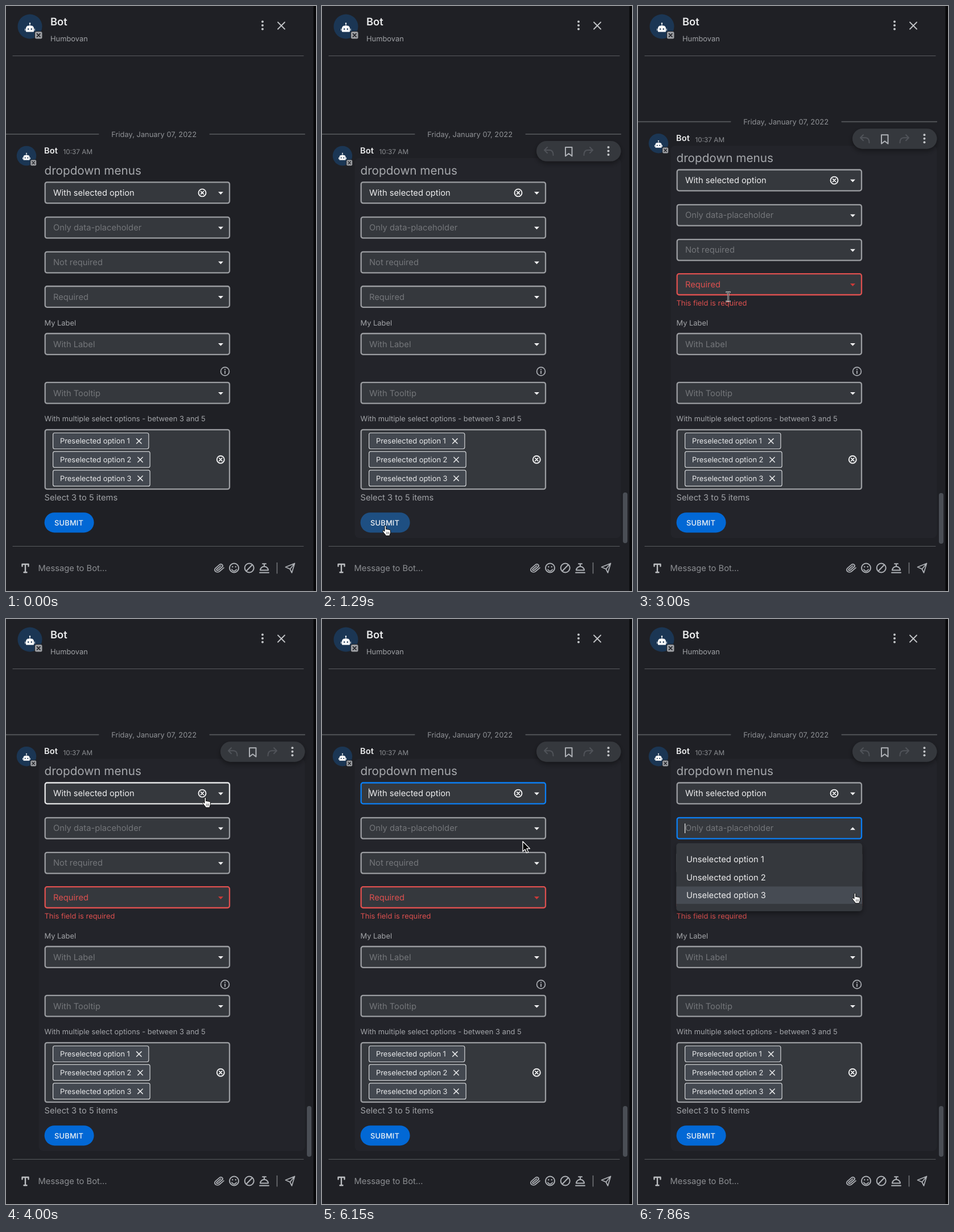
An HTML page that plays this animation: 545x1027 px, repeating every 8 s.

```html
<!DOCTYPE html>
<html lang="en">
<head>
<meta charset="utf-8">
<title>Dropdown menus</title>
<style>
  html, body { margin: 0; width: 100%; height: 100%; overflow: hidden; background: #1f2025; }
  svg { display: block; width: 545px; height: 1027px; }
  text { font-family: Inter, sans-serif; font-optical-sizing: none; text-rendering: geometricPrecision; }
  .line { fill: none; stroke-linecap: round; stroke-linejoin: round; }
</style>
</head>
<body>
<svg id="stage" viewBox="0 0 545 1027" xmlns="http://www.w3.org/2000/svg"></svg>
<script>
const STEP = 8000 / 56, LOOP = 8000, SHIFT = -21.8;
const BODY = 14.72, SMALL = 12.88;
const GREY = '#9b9da1', RED = '#dd504f', BLUE = '#0b7ff5', LIGHT = '#e6e7e8', ICON = '#adb0b5';

const text = (x, y, str, size, fill, weight = 400, extra = '') =>
  `<text x="${x}" y="${y}" font-size="${size}" fill="${fill}" font-weight="${weight}" ${extra}>${str}</text>`;
const rect = (x, y, w, h, r, fill, extra = '') =>
  `<rect x="${x}" y="${y}" width="${w}" height="${h}" rx="${r}" fill="${fill}" ${extra}/>`;
const path = (d, stroke, width = 2, extra = '') =>
  `<path class="line" d="${d}" stroke="${stroke}" stroke-width="${width}" ${extra}/>`;
const ring = (x, y, r, stroke, width) =>
  `<circle cx="${x}" cy="${y}" r="${r}" fill="none" stroke="${stroke}" stroke-width="${width}"/>`;
const cross = (x, y, s, stroke, width) =>
  path(`M${x - s} ${y - s}l${2 * s} ${2 * s}m0 ${-2 * s}l${-2 * s} ${2 * s}`, stroke, width);
const dots = (x, y) => [-6.5, 0, 6.5].map(d => `<circle cx="${x}" cy="${y + d}" r="2" fill="#c3c5c8"/>`).join('');
const clear = (x, y) => ring(x, y, 6.5, '#f0f0f1', 1.9) + cross(x, y, 2.3, '#f0f0f1', 1.9);

function avatar(x, y, s) {
  return `<g transform="translate(${x} ${y}) scale(${s})">
    <circle r="21.5" fill="#1b3654"/>
    <path d="M-6 9.500Q-7 9.500-7 8.500V4Q-7-1.500-2-1.500H2Q7-1.500 7 4V8.500Q7 9.500 6 9.500Z" fill="#fff"/>
    <path d="M0-1.500V-5M-8.200 4V7M8.200 4V7" stroke="#fff" stroke-width="1.1" stroke-linecap="round"/>
    <circle cy="-5.500" r="1.200" fill="#fff"/>
    <circle cx="-2.800" cy="4.500" r="1.300" fill="#1b3654"/><circle cx="2.800" cy="4.500" r="1.300" fill="#1b3654"/>
    ${rect(8, 8, 14.5, 14.5, 3.5, '#1f2025')}${rect(9, 9, 12.5, 12.5, 2.5, GREY)}
    ${cross(15.25, 15.25, 2.7, '#1f2025', 1.7)}</g>`;
}

function field(i, y, label, selected) {
  return rect(68.7, y - 18.4, 324.3, 36.8, 3.5, '#35383d', `id="box${i}" stroke="${GREY}" stroke-width="2.3"`)
    + text(83, y + 5.3, label, BODY, selected ? '#eeeeef' : '#74767a', 400, `id="label${i}"`)
    + (selected ? clear(345, y + .2) : '')
    + `<path id="tri${i}" d="M-4.500-2.200H4.500L0 2.500Z" fill="#f4f4f5"/>`;
}

function chip(n, y, w) {
  return rect(82.6, y - 14, w, 28, 3, '#434850', 'stroke="#d3d5d8" stroke-width="1.2"')
    + text(95, y + 4.7, `Preselected option ${n}`, SMALL, '#e9eaeb')
    + cross(w + 65.5, y + .3, 4.2, '#e9eaeb', 1.5);
}

function menu(id, y, options, checked) {
  return `<g id="${id}">` + rect(67.4, y, 326.8, 119.4, 5, '#34373c', 'filter="url(#shadow)"')
    + rect(67.4, y + 13, 326.8, 30.5, 0, '#464b53', `id="${id}Row"`)
    + options.map((o, i) => text(85, y + 33.4 + 31.5 * i, o, BODY, '#eeeeef')).join('')
    + (checked ? path(`M361 ${y + 60}l5 5l10-10.500`, '#f0f0f1', 1.8) : '') + '</g>';
}

const fieldsY = [327.7, 389, 450, 510.4, 593.4, 679.3];
const labels = ['With selected option', 'Only data-placeholder', 'Not required', 'Required', 'With Label', 'With Tooltip'];
const makeField = i => field(i, fieldsY[i], labels[i], i === 0);

const header = avatar(42, 36, 1)
  + text(78, 33.6, 'Bot', 18.4, '#e9eaeb', 600)
  + text(78, 61.8, 'Humbovan', SMALL, '#a0a2a6')
  + dots(451, 34) + cross(484, 34.5, 6, '#c3c5c8', 1.8)
  + path('M12 87.500H523M12 948.500H523', '#595b5f', 1.2);

const toolbar = '<g id="tools">'
  + rect(377, 237, 148.5, 35.5, 17.7, '#36383d', 'filter="url(#shadow)"')
  + path('M396 248l-5 5l5 5M391.500 253H400Q406.500 253 406.500 262', '#505359', 2)
  + path('M428 248h11.500v15.500l-5.750-4.500l-5.750 4.500z', ICON, 2)
  + path('M471 248l5 5l-5 5M475.500 253H467Q460.500 253 460.500 262', '#505359', 2)
  + dots(503.5, 254.5) + '</g>';

const upper = '<g id="upper">'
  + path('M0 225H162.500M358.500 225H525', '#4b4d51', 2.2)
  + text(185.3, 229.7, 'Friday, January 07, 2022', SMALL, '#8f9195')
  + avatar(36, 263, .8)
  + text(67, 259.2, 'Bot', BODY, '#e9eaeb', 600)
  + text(100.5, 260.4, '10:37 AM', 11.75, '#8c8e92')
  + text(67.5, 296.3, 'dropdown menus', 20.7, '#a6a8ac')
  + [0, 1, 2, 3].map(makeField).join('') + toolbar + '</g>';

const lower = text(67.5, 561.4, 'My Label', SMALL, '#a3a5a9') + makeField(4)
  + ring(385, 641.5, 7.4, ICON, 1.7) + path('M385 641v4', ICON, 1.8)
  + `<circle cx="385" cy="638" r="1.100" fill="${ICON}"/>` + makeField(5)
  + text(67.5, 729.4, 'With multiple select options - between 3 and 5', SMALL, '#a3a5a9')
  + rect(68.7, 743.8, 324.3, 104.4, 3.5, '#35383d', `stroke="${GREY}" stroke-width="2.3"`)
  + chip(1, 763.5, 168.3) + chip(2, 796.2, 170.5) + chip(3, 828.9, 170.5) + clear(377.3, 796.2)
  + text(67.5, 868.3, 'Select 3 to 5 items', BODY, '#a0a2a6')
  + rect(67.6, 889.2, 87, 35.2, 17.6, '#0268d5', 'id="submit"')
  + text(85, 912, 'SUBMIT', SMALL, '#f1f3f5', 500, 'letter-spacing=".2"');

const composer = path('M28.500 983.500V980H39.500V983.500M34 980.500V994M31.500 994.300H36.500', '#bcbec1', 2.4)
  + text(56.5, 991.7, 'Message to Bot...', BODY, '#8c8e92')
  + path('m21.440 11.050-9.190 9.190a6 6 0 0 1-8.490-8.490l8.570-8.570A4 4 0 1 1 18 8.840l-8.590 8.570a2 2 0 0 1-2.830-2.830l8.490-8.480',
    ICON, 2.4, 'transform="translate(365.300 978.500) scale(.82 .7)"')
  + ring(401, 986.5, 8, ICON, 2) + path('M397 989a4.200 4 0 0 0 8 0', ICON, 1.7)
  + `<circle cx="398.200" cy="984.500" r="1.200" fill="${ICON}"/><circle cx="403.800" cy="984.500" r="1.200" fill="${ICON}"/>`
  + ring(427.7, 986.5, 8, ICON, 2) + path('M422.500 992l10.500-11', ICON, 2)
  + path('M447 990.500a7 6.500 0 0 1 14 0zM446 994.800H462M454 984V980M451 979.300H457', ICON, 2)
  + path('M476.500 977.500V996', '#7c7e82', 1.4)
  + path('M491.500 985L507.500 978.500L502.500 995L499.300 988.500ZM499.300 988.500L507.500 978.500', ICON, 1.7);

const beamPath = 'M-3-8Q0-8 0-6V6Q0 8-3 8M3-8Q0-8 0-6M0 6Q0 8 3 8';
const cursors = `<g id="cursor">
  <path id="arrow" d="M0 0V17.500L4 13.800L6.800 20L9.800 18.700L7 12.600H12.500Z" fill="#000" stroke="#fff" stroke-width="1.300" stroke-linejoin="round"/>
  <g id="hand"><path d="M0 1.500C0 .2 2.800 .2 2.800 1.600V7C3 6 5.300 6 5.500 7.400C5.800 6.400 8 6.600 8.100 8C8.400 7.200 10.400 7.400 10.400 9V12.500C10.400 14.500 9 15.500 9 18H2C2 16-.5 14.500-3 10.800C-4.200 9-2.200 8-1 9.200L0 10.300Z" fill="#fff" stroke="#000" stroke-width="1"/>
  ${path('M3.500 11.500v3.500M5.500 11.500v3.500M7.500 11.500v3.500', '#333', .7)}</g>
  <g id="beam">${path(beamPath, '#fff', 2.4)}${path(beamPath, '#000', 1)}</g>
</g>`;

document.getElementById('stage').innerHTML = `<defs><filter id="shadow" x="-20%" y="-40%" width="140%" height="190%">
  <feDropShadow dx="0" dy="4" stdDeviation="5" flood-color="#0c0d10" flood-opacity=".4"/></filter></defs>`
  + rect(0, 0, 545, 1027, 0, '#1f2025') + rect(540.5, 0, 4.5, 1027, 0, '#08080a')
  + rect(57.5, 267, 468, 667, 8, '#23242a', 'id="panel"')
  + header + upper
  + text(67.5, 526.2, 'This field is required', SMALL, RED, 400, 'id="error"')
  + lower + composer
  + rect(529, 854.5, 8, 89, 4, '#4a4e55', 'id="bar"')
  + menu('menu0', 333, ['Unselected option 1', 'With selected option', 'Unselected option 2'], true)
  + menu('menu1', 393.6, ['Unselected option 1', 'Unselected option 2', 'Unselected option 3'])
  + rect(82, 0, 1.2, 17, 0, '#f0f0f1', 'id="caret"')
  + cursors;

const $ = id => document.getElementById(id);
const show = (id, on) => $(id).setAttribute('visibility', on ? 'visible' : 'hidden');
const set = (id, name, value) => $(id).setAttribute(name, value);

// Pointer stops: step, x, y
const stops = [[1, 330, 860], [8, 110, 912], [10, 110, 912], [13, 144, 551], [16, 150, 519], [20, 150, 519],
  [28, 349, 313], [32, 349, 313], [35, 350, 365], [37, 350, 365], [40, 350, 392], [42, 350, 392],
  [49, 403, 366], [51, 408, 366], [53, 381, 371], [54, 380, 381], [55, 380, 481]];

function pointer(k) {
  const i = stops.findIndex(s => s[0] >= k);
  if (i < 1) return stops[0].slice(1);
  const a = stops[i - 1], b = stops[i];
  const p = (k - a[0]) / (b[0] - a[0]), e = p * p * (3 - 2 * p);
  return [a[1] + (b[1] - a[1]) * e, a[2] + (b[2] - a[2]) * e];
}

function highlight(id, top, y, fallback) {
  const row = Math.floor((y - top - 13) / 31.5);
  set(id + 'Row', 'y', top + 13 + 31.5 * (row < 0 ? fallback : Math.min(row, 2)));
}

function render(k) {
  const [x, y] = pointer(k);
  const active = k >= 1, failed = k >= 11;
  const focus = k >= 54 ? 1 : k >= 30 && k < 53 ? 0 : -1;
  const open = k >= 54 ? 1 : k >= 31 && k < 42 ? 0 : -1;
  const shift = failed ? SHIFT : 0;

  set('upper', 'transform', `translate(0 ${shift})`);
  set('panel', 'y', 267 + shift);
  set('panel', 'height', 667 - shift);
  set('bar', 'y', failed ? 855 : 854);
  ['panel', 'tools', 'bar', 'cursor'].forEach(id => show(id, active));
  show('error', failed);

  let over = -1;
  fieldsY.forEach((fy, i) => {
    const cy = fy + (i < 4 ? shift : 0);
    if (active && x > 68 && x < 394 && Math.abs(y - cy) < 19.5) over = i;
  });
  if (open >= 0 && over !== open) over = -1;

  fieldsY.forEach((fy, i) => {
    const bad = failed && i === 3;
    set('box' + i, 'stroke', bad ? RED : i === focus ? BLUE : i === over ? LIGHT : GREY);
    set('tri' + i, 'fill', bad ? '#cf3a38' : '#f4f4f5');
    set('tri' + i, 'transform', `translate(377.5 ${fy + .8})${i === open ? ' scale(1 -1)' : ''}`);
    if (i === 3) set('label3', 'fill', bad ? RED : '#74767a');
  });

  for (const [i, top, first] of [[0, 333, 1], [1, 393.6, 0]]) {
    $('menu' + i).style.display = i === open ? '' : 'none';
    highlight('menu' + i, top, y, first);
  }

  const blink = focus === 1 || focus === 0 && open < 0 && (k < 45 || k >= 49);
  show('caret', blink);
  set('caret', 'y', focus === 1 ? 359 : 297.5);

  const onSubmit = active && x > 68 && x < 154 && y > 889 && y < 924;
  set('submit', 'fill', onSubmit ? '#1e4f82' : '#0268d5');

  const hand = onSubmit || over >= 0 || open >= 0;
  const beam = !hand && failed && x < 192 && y > 510 && y < 531;
  const shape = hand ? 'hand' : beam ? 'beam' : 'arrow';
  for (const id of ['hand', 'beam', 'arrow']) $(id).style.display = id === shape ? '' : 'none';
  set('cursor', 'transform', `translate(${x} ${y})`);
}

let last = -1;
function tick() {
  const k = Math.floor(performance.now() % LOOP / STEP);
  if (k !== last) render(last = k);
  requestAnimationFrame(tick);
}
tick();
</script>
</body>
</html>
```
